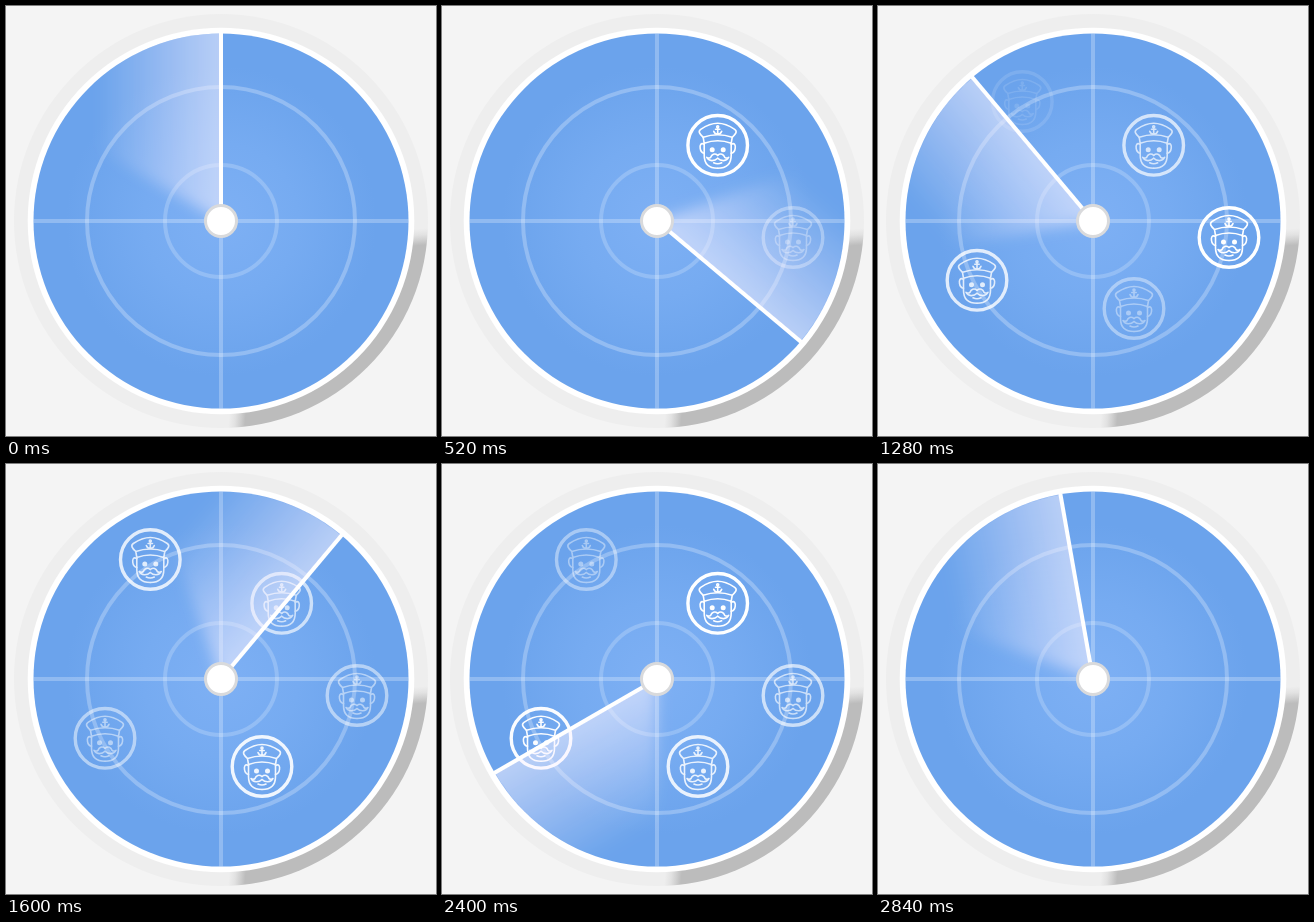
Animation, 430 px wide and 430 px high, one loop 2.88 s. Source, as an HTML page without scripts:

```html
<!DOCTYPE html>
<html lang="en">
<head>
<meta charset="utf-8">
<title>Radar</title>
<style>
  html, body { margin: 0; width: 100%; height: 100%; overflow: hidden; background: #f4f4f4; }
  svg { display: block; width: 100vw; height: 100vh; }

  /* two turns of the beam per loop, in 10 degree ticks */
  .beam { animation: turn 1440ms steps(36) -2ms infinite; }
  @keyframes turn { to { transform: rotate(360deg); } }

  .blips { animation: cut 2880ms linear infinite; }
  @keyframes cut { 0%, 98.5% { opacity: 1; } 98.51%, 100% { opacity: 0; } }

  .blip { opacity: 0; animation: 2880ms linear infinite; }
  .a { animation-name: a; }
  .b { animation-name: b; }
  .c { animation-name: c; }
  .d { animation-name: d; }
  .e { animation-name: e; }
  @keyframes a {
    0%, 4.2% { opacity: 0; } 16% { opacity: 1; } 19% { opacity: 1; } 44.4% { opacity: .7; }
    52% { opacity: .62; } 55.6% { opacity: .65; } 70.8% { opacity: .85; } 83.3% { opacity: 1; } 100% { opacity: .72; }
  }
  @keyframes b {
    0%, 10.5% { opacity: 0; } 18.1% { opacity: .33; } 38% { opacity: 1; } 44.4% { opacity: 1; }
    55.6% { opacity: .5; } 66% { opacity: .32; } 70.8% { opacity: .35; } 83.3% { opacity: .65; } 100% { opacity: 1; }
  }
  @keyframes c {
    0%, 35.5% { opacity: 0; } 44.4% { opacity: .4; } 55.6% { opacity: .9; } 60% { opacity: 1; }
    70.8% { opacity: 1; } 83.3% { opacity: .85; } 100% { opacity: .55; }
  }
  @keyframes d {
    0%, 21% { opacity: 0; } 37% { opacity: 1; } 44.4% { opacity: .8; } 55.6% { opacity: .5; }
    70.8% { opacity: .75; } 83.3% { opacity: .97; } 100% { opacity: .7; }
  }
  @keyframes e {
    0%, 42.4% { opacity: 0; } 44.4% { opacity: .12; } 55.6% { opacity: .8; } 60% { opacity: .95; }
    70.8% { opacity: .7; } 83.3% { opacity: .42; } 100% { opacity: .3; }
  }
</style>
</head>
<body>
<svg viewBox="-215 -215 430 430">
  <defs>
    <radialGradient id="halo" gradientUnits="userSpaceOnUse" r="208">
      <stop offset=".92" stop-color="#bcbcbc"/>
      <stop offset=".945" stop-color="#d0d0d0"/>
      <stop offset=".97" stop-color="#e2e2e2"/>
      <stop offset="1" stop-color="#eeeeee"/>
    </radialGradient>
    <radialGradient id="sea" gradientUnits="userSpaceOnUse" cx="0" cy="0" r="155">
      <stop offset="0" stop-color="#7eb0f4"/>
      <stop offset=".5" stop-color="#76abf1"/>
      <stop offset="1" stop-color="#6ba3ec"/>
    </radialGradient>
    <linearGradient id="glow" gradientUnits="userSpaceOnUse" x1="0" x2="-125" y1="0" y2="0">
      <stop offset="0" stop-color="#faf2ff" stop-opacity=".55"/>
      <stop offset="1" stop-color="#faf2ff" stop-opacity="0"/>
    </linearGradient>
    <filter id="soft" filterUnits="userSpaceOnUse" x="-240" y="-240" width="320" height="300">
      <feGaussianBlur stdDeviation="7"/>
    </filter>
    <clipPath id="half"><path d="M0 -187.5A187.5 187.5 0 0 0 -187.5 0V6H0Z"/></clipPath>

    <g id="side">
      <path d="M-13.5 -1C-17 -3 -18 0 -17.5 3Q-17 7 -13.5 8"/>
      <path d="M-13.5 -2V10C-13.5 19 -8 23 0 23"/>
      <path d="M0 10C-3 7.5 -6 9 -7 12Q-9 13.5 -11 12C-9 16.5 -3 16 0 13"/>
      <circle cx="-5.5" cy="4.5" r="1.7" fill="#fff"/>
    </g>
    <g id="captain" fill="none" stroke="#fff" stroke-width="1.6" stroke-linecap="round" stroke-linejoin="round">
      <circle r="29.8" stroke-width="3.4"/>
      <path d="M-14.5 -8C-18 -11 -20 -14 -17 -16Q-8 -22 0 -22Q8 -22 17 -16C20 -14 18 -11 14.5 -8"/>
      <path d="M-14.5 -8Q0 -13 14.5 -8L13.5 -2Q0 -7 -13.5 -2Z"/>
      <path d="M0 -18V-11.5M-2.2 -16H2.2M-4 -14Q-3 -11 0 -11Q3 -11 4 -14"/>
      <circle cy="-18.5" r="1"/>
      <use href="#side"/>
      <use href="#side" transform="scale(-1 1)"/>
      <path d="M-4 17.5Q0 19.5 4 17.5"/>
    </g>
  </defs>

  <circle r="207" fill="url(#halo)"/>
  <circle r="193.3" fill="#fff"/>
  <circle r="187.5" fill="url(#sea)"/>

  <g fill="none" stroke="#fff" stroke-width="4" stroke-opacity=".25">
    <circle r="56" stroke-opacity=".2"/>
    <circle r="134"/>
    <path d="M-187.5 0H187.5M0 -187.5V187.5"/>
  </g>

  <g class="blips">
    <g class="blip a"><use href="#captain" x="60.7" y="-75.7"/></g>
    <g class="blip b"><use href="#captain" x="136" y="16.5"/></g>
    <g class="blip c"><use href="#captain" x="41" y="87.5"/></g>
    <g class="blip d"><use href="#captain" x="-116" y="59.3"/></g>
    <g class="blip e"><use href="#captain" x="-70.7" y="-119.5"/></g>
  </g>

  <g class="beam">
    <g clip-path="url(#half)">
      <path d="M0 0L-225 -130V-230H60V0Z" fill="url(#glow)" filter="url(#soft)"/>
    </g>
    <path d="M0 0V-188" stroke="#fff" stroke-width="4"/>
  </g>

  <circle r="15.5" fill="#fff" stroke="#d9dadc" stroke-width="3"/>
</svg>
</body>
</html>
```
